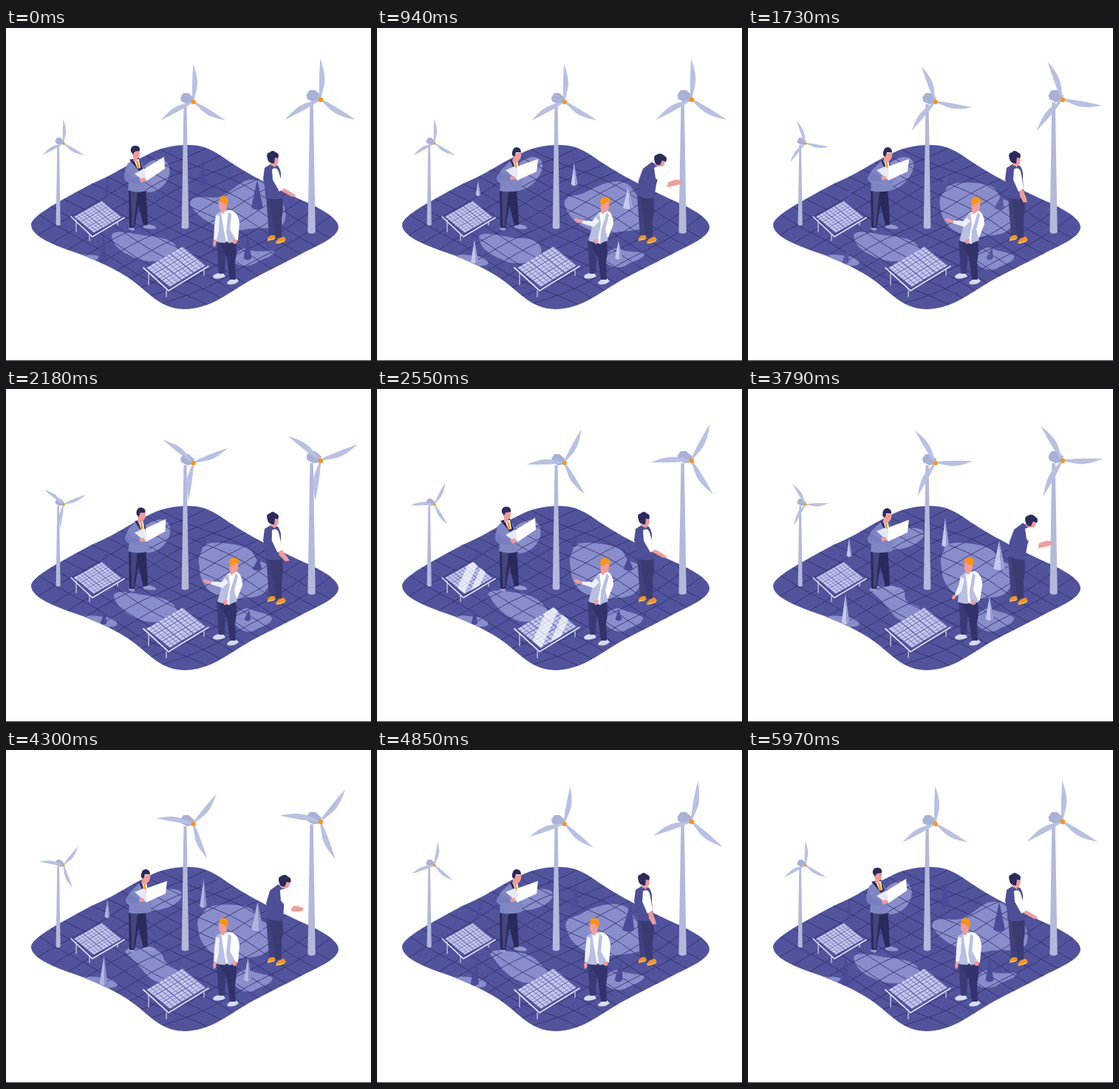
An HTML page for the animation above (6 s loop, 494 by 450 pixels).

```html
<!DOCTYPE html>
<html lang="en">
<head>
<meta charset="utf-8">
<title>Wind and solar farm</title>
<style>
html, body { margin: 0; width: 100%; height: 100%; overflow: hidden; background: #fff; }
svg { display: block; width: 494px; height: 450px; }
</style>
</head>
<body>
<svg id="stage" viewBox="0 0 494 450"></svg>
<script>
const LOOP = 6000;
const INK = '#2a2a5c', GROUND = '#51539d', PATCH = '#888dcb', STEEL = '#b2b9da',
  SKIN = '#f09c98', ORANGE = '#fa9512', COAT = '#7f86c4', VEST = '#b7bfe2', WHITE = '#fff';
const stage = document.getElementById('stage');
const updates = [];

function add(parent, tag, attrs) {
  const node = document.createElementNS('http://www.w3.org/2000/svg', tag);
  for (const name in attrs) node.setAttribute(name, attrs[name]);
  parent.appendChild(node);
  return node;
}
const group = (parent, attrs = {}) => add(parent, 'g', attrs);
const shape = (parent, fill, d) => add(parent, 'path', { d, fill });
const line = (parent, d, stroke, width) =>
  add(parent, 'path', { d, stroke, fill: 'none', 'stroke-width': width, 'stroke-linecap': 'round' });
const clip = (id, d) => add(add(defs, 'clipPath', { id }), 'path', { d });
const clamp = x => Math.max(0, Math.min(1, x));
const smooth = x => x * x * (3 - 2 * x);

// cubic-bezier(.5, 0, .5, 1), solved by bisection
function easeInOut(x) {
  let lo = 0, hi = 1;
  for (let i = 0; i < 24; i++) {
    const s = (lo + hi) / 2;
    if (1.5 * s * (1 - s) + s * s * s < x) lo = s; else hi = s;
  }
  return smooth(lo);
}

// Keys are [time, pose index]; gives the two poses in play and the blend
const track = (period, keys) => t => {
  const p = t % period;
  let i = 0;
  while (i < keys.length - 2 && p >= keys[i + 1][0]) i++;
  const [t0, from] = keys[i], [t1, to] = keys[i + 1];
  return [from, to, smooth(clamp((p - t0) / (t1 - t0)))];
};

// Each pose is the same path with other coordinates
function morph(parent, fill, timing, poses) {
  const node = shape(parent, fill, poses[0]);
  const values = poses.map(d => d.match(/-?[\d.]+/g).map(Number));
  updates.push(t => {
    const [from, to, w] = timing(t);
    let k = 0;
    node.setAttribute('d', poses[0].replace(/-?[\d.]+/g, () => {
      const a = values[from][k], b = values[to][k++];
      return (a + (b - a) * w).toFixed(2);
    }));
  });
}

// Ground
const defs = add(stage, 'defs');
add(stage, 'rect', { width: 494, height: 450, fill: WHITE });
const outline = 'M34 266C34 256 62 240 82 229C98 220 112 212 126 206C146 198 170 181 192 171' +
  'C214 158 250 155 268 161C286 167 296 177 311 186C324 194 334 200 346 206C364 216 384 225 401 233' +
  'C422 242 450 256 450 269C450 282 424 293 404 303C384 314 350 330 327 343C298 360 275 380 241 380' +
  'C208 379 193 357 172 342C152 327 126 316 104 307C76 297 34 284 34 266Z';
clip('land', outline);
shape(stage, GROUND, outline);
const land = group(stage, { 'clip-path': 'url(#land)' });

const slow = track(LOOP, [[0, 0], [2300, 1], [3700, 1], [6000, 0]]);
morph(land, PATCH, slow, [
  'M249 238C250 222 275 232 290 228C305 222 318 205 332 205C350 205 352 215 358 222C375 230 382 248 377 262C368 275 345 268 325 272C300 278 262 262 249 238Z',
  'M262 240C258 225 266 222 266 212C275 205 300 208 318 212C335 216 334 224 340 232C355 236 362 240 358 255C356 275 345 282 325 282C300 288 262 280 262 240Z'
]);
const upper = track(LOOP, [[0, 0], [1400, 1], [2550, 0], [3700, 2], [4850, 2], [5900, 0]]);
morph(land, PATCH, upper, [
  'M178 205C180 188 195 178 208 177C220 178 224 190 220 202C215 214 204 222 192 222Z',
  'M178 206C180 190 195 178 208 174C224 171 229 182 221 196C214 208 204 217 190 219Z',
  'M178 208C180 196 196 190 212 188C228 186 241 189 238 198C234 208 212 219 190 217Z'
]);
const lower = track(LOOP, [[0, 0], [940, 1], [1730, 0], [3790, 2], [5900, 0]]);
morph(land, PATCH, lower, [
  'M143 280C146 272 165 276 185 280C205 282 226 284 232 298C234 312 205 318 185 314C165 308 144 298 143 280Z',
  'M138 282C142 274 165 280 185 284C205 284 218 284 222 298C226 314 198 321 180 317C160 310 138 300 138 282Z',
  'M164 272C166 262 186 268 205 268C220 274 204 283 222 291C242 296 240 313 214 315C190 308 198 297 164 272Z'
]);
morph(land, PATCH, track(LOOP, [[0, 0], [900, 1], [4600, 1], [6000, 0]]), [
  'M88 306C98 308 112 305 125 308C126 313 118 316 108 315C100 314 94 311 88 306Z',
  'M98 309C110 304 126 307 141 309C152 313 154 320 145 321C128 323 110 317 98 309Z'
]);
morph(land, PATCH, slow, [
  'M305 313C312 306 316 296 326 298C334 304 348 301 363 301C366 308 345 312 337 318C326 324 312 322 305 313Z',
  'M305 310C312 304 320 293 330 297C338 302 353 302 360 309C360 319 343 321 335 327C322 331 310 322 305 310Z'
]);

// The lines overshoot the land on both ends and are clipped by it
function gridLine(a, b, bend, wave) {
  let d = '';
  for (let i = -2; i <= 26; i++) {
    const u = i / 24;
    const y = a[1] + (b[1] - a[1]) * u + bend * Math.sin(Math.PI * u) + wave * Math.sin(u * 9.4 + a[0] * .03);
    d += (d ? 'L' : 'M') + (a[0] + (b[0] - a[0]) * u).toFixed(1) + ' ' + y.toFixed(1);
  }
  line(land, d, '#2e2d66', .8);
}
for (let i = 1; i < 11; i++) {
  const u = i / 11;
  gridLine([35 + 200 * u, 265 - 107 * u], [240 + 210 * u, 380 - 110 * u], 8 - 18 * u, 2.4);
  gridLine([235 + 215 * u, 158 + 112 * u], [35 + 205 * u, 265 + 115 * u], 16 * u - 7, 2);
}

// Cones: they shrink and grow slowly and catch the light twice per loop
const growth = track(LOOP, [[0, 1], [2300, .42], [3700, 1], [6000, 1]]);
function cone(x, y, half, height) {
  const dark = shape(stage, '#494b98', ''), lit = group(stage);
  const left = shape(lit, '#c3c9eb', ''), right = shape(lit, '#9ba1d6', '');
  updates.push(t => {
    const [from, to, blend] = growth(t), size = from + (to - from) * blend;
    const p = t % 3000;
    const light = smooth(clamp((p - 250) / 450)) * (1 - smooth(clamp((p - 1100) / 800)));
    const lean = 4 * Math.exp(-(((p - 1850) / 400) ** 2));
    const top = `M${x + lean} ${y - height * size}`, w = half * (.65 + .35 * size);
    dark.setAttribute('d', `${top}L${x - w} ${y - 2}Q${x} ${y + 3} ${x + w} ${y - 2}Z`);
    left.setAttribute('d', `${top}L${x - w} ${y - 2}Q${x - w / 3} ${y + 1} ${x + w / 3} ${y}Z`);
    right.setAttribute('d', `${top}L${x + w / 3} ${y}L${x + w} ${y - 2}Z`);
    lit.setAttribute('opacity', light);
  });
}
cone(137, 227, 3.5, 26);
cone(267, 213, 4.8, 39);
cone(340, 245, 8, 40);
cone(132, 318, 5.5, 41);
cone(327, 313, 5.5, 33);
add(stage, 'circle', { cx: 152.5, cy: 192.5, r: .6, fill: INK });

// Solar panels, drawn on a unit square that is skewed into place
function panel(id, left, top, bottom, cols, rows, legs) {
  const right = [top[0] + bottom[0] - left[0], top[1] + bottom[1] - left[1]];
  for (const [x, y, h] of legs) line(stage, `M${x} ${y}v${h}`, '#9da2c6', 2);
  const at = ([x, y], dx, dy) => `${x + dx} ${y + dy}`;
  const quad = 'M' + [left, top, right, bottom].map(p => at(p, 0, 0)).join('L') + 'Z';
  const g = group(stage, { transform: `matrix(${top[0] - left[0]} ${top[1] - left[1]} ${bottom[0] - left[0]} ${bottom[1] - left[1]} ${left[0]} ${left[1]})` });
  add(g, 'rect', { width: 1, height: 1, fill: '#6d72b6' });
  const w = 1 / cols, h = 1 / rows;
  for (let c = 0; c < cols; c++) for (let r = 0; r < rows; r++)
    add(g, 'rect', {
      x: (c + .07) * w, y: (r + .07) * h, fill: '#c6cbee',
      width: w * (c % 3 == 2 ? .72 : .86), height: h * (r % 3 == 2 ? .72 : .86)
    });
  clip(id, quad);
  const width = right[0] - left[0], height = bottom[1] - top[1];
  const sheen = add(group(stage, { 'clip-path': `url(#${id})` }), 'path', { fill: WHITE, opacity: .68 });
  updates.push(t => {
    const x = left[0] + width * (-.5 + 2 * clamp((t - 2050) / 1000));
    const band = (x, w) => `M${x} ${bottom[1]}h${w}l${height * .45} ${-height}h${-w}Z`;
    sheen.setAttribute('d', band(x - width * .3, width * .2) + band(x, width * .14));
  });
  const rim = 'M' + at(left, -4, 0) + 'L' + at(bottom, -2, 5) + 'L' + at(right, 3, 1);
  line(stage, rim, '#e4e7f7', 1.7);
}
panel('near', [92, 255], [130, 233.5], [119, 277], 9, 9, [[95, 260, 15], [113, 279, 8], [151, 262, 4]]);
panel('far', [190, 324], [239, 295], [222, 350], 9, 9, [[193, 331, 16], [217, 355, 8], [268, 328, 6]]);

// Wind turbines
function turbine(x, y, scale, height) {
  const g = group(stage, { transform: `translate(${x} ${y}) scale(${scale})` });
  shape(g, STEEL, `M-13.5 3H-9.5L-6.7 ${height}Q-11.5 ${height + 3} -16.3 ${height}Z`);
  shape(g, '#a8b1d6', 'M-18 -6L-14 -12L-7 -12L1 -5L-2 2L-9 3L-17 -1Z');
  const rotor = group(g);
  for (let i = 0; i < 3; i++)
    add(rotor, 'path', {
      d: 'M-1 -3C-2 -18 -1 -36 0 -51C4 -39 7.5 -27 4.5 -16L1.3 -3Z', fill: '#b8c0e3', transform: `rotate(${i * 120})`
    });
  add(g, 'circle', { r: 2.9, fill: ORANGE });
  updates.push(t => {
    const turn = -360 * easeInOut(clamp((t - 850) / 4600));
    rotor.setAttribute('transform', `translate(-.6 -.6) rotate(${turn.toFixed(2)})`);
  });
}
turbine(254, 100, 1, 170);
turbine(426, 97, 1.08, 166);
turbine(78, 156, .64, 172);

// Man with laptop
const reader = track(3000, [[0, 0], [150, 0], [900, 1], [1900, 1], [2500, 0], [3000, 0]]);
const man = group(stage);
shape(man, '#9398cf', 'M186 267Q190 264 196 266Q204 268 203 271Q196 273 186 270Z');
shape(man, '#9398cf', 'M167 268H174V273Q168 275 166 271Z');
shape(man, INK, 'M177 217L189 217Q191 240 192 266L186 267L179 238Z');
shape(man, INK, 'M166 217L182 217Q183 232 178 246L174 270L167 270Z');
shape(man, '#45467c', 'M169 220L178 220L173 268L170 268Z');
morph(man, COAT, reader, [
  'M164 184L170 179L183 181Q188 190 188 205L190 220Q178 224 165 219L166 208Q160 204 160 197Z',
  'M168 192L180 180L191 181Q198 190 197 205L196 219Q180 223 166 220L167 210Q161 206 162 202Z'
]);
morph(man, INK, reader, ['M167 178L180 175L185 190L180 193Z', 'M180 179L190 177L194 191L187 194Z']);
morph(man, WHITE, reader, ['M173 178L180 177L182 189L178 190Z', 'M184 179L190 178L192 190L187 191Z']);
morph(man, ORANGE, reader, ['M176 180L179 180L181 190L178 190Z', 'M186 181L188 181L190 190L187 190Z']);
morph(man, SKIN, reader, [
  'M170 166L181 165Q182 174 178 176L177 180L172 180L172 174Z',
  'M184 170L195 168Q196 176 192 179L189 182L183 181L184 176Z'
]);
morph(man, INK, reader, [
  'M169 167Q168 159 175 159Q182 159 181 166L174 167L172 171Z',
  'M183 172Q182 162 189 161Q195 162 195 168L188 168L186 174Z'
]);
morph(man, '#e6e9f6', reader, ['M174 197L187 190L200 198L187 207Z', 'M174 192L186 187L201 198L190 206Z']);
morph(man, WHITE, reader, ['M188 190L214 174L215 190L190 207Z', 'M190 187L218 177L216 194L190 206Z']);
morph(man, '#777ebf', reader, [
  'M162 192Q157 205 165 209L182 210L184 205L170 201Z',
  'M167 195Q161 204 168 207L182 207L184 202L174 199Z'
]);
morph(man, SKIN, reader, ['M180 204L187 202L190 206L183 209Z', 'M180 201L186 200L188 204L181 206Z']);

// Man with orange hair
const talker = track(LOOP, [[0, 0], [100, 0], [800, 1], [3200, 1], [4150, 0], [6000, 0]]);
const host = group(stage);
shape(host, '#d7dbf1', 'M280 335Q286 330 294 331L297 336Q288 340 281 338Z');
shape(host, '#d7dbf1', 'M299 344Q304 338 311 338L315 342Q309 348 300 346Z');
shape(host, '#3a3b76', 'M285 286L302 286L297 310L296 332L288 332Z');
shape(host, '#32336b', 'M287 286L310 286Q314 300 310 316L311 340L303 340L299 310Z');
morph(host, WHITE, talker, [
  'M290 248L304 246Q314 248 316 264L314 287L305 290L287 286Z',
  'M299 250L311 246Q320 250 320 265L313 283L302 292L290 286Z'
]);
morph(host, VEST, talker, [
  'M284 252L291 247L293 262L298 290Q290 291 283 288Q282 268 284 252Z',
  'M294 256L301 249L303 265L298 290Q291 290 286 287Q291 272 294 256Z'
]);
morph(host, VEST, talker, [
  'M301 248L305 252L303 272L312 288L301 291L298 275Z',
  'M311 249L314 253L309 272L313 287L302 291L303 274Z'
]);
morph(host, '#eef0fa', talker, [
  'M284 253L289 254L288 274L285 287L281 286L282 268Z',
  'M296 256L301 261L293 269L278 264L278 260L291 261Z'
]);
morph(host, SKIN, talker, ['M281 286L285 287L284 294L281 296L280 291Z', 'M278 260L278 264L270 262L266 259L269 257Z']);
morph(host, SKIN, talker, [
  'M288 235L299 234Q300 243 297 247L294 251L291 249L291 246Q287 245 288 235Z',
  'M303 237L314 235Q315 244 312 247L307 250L304 252L303 246Q302 244 303 237Z'
]);
morph(host, ORANGE, talker, [
  'M288 234Q288 227 295 227Q302 228 301 236L297 240L295 235Z',
  'M302 236Q302 228 309 228Q317 229 316 236L311 235L305 240Z'
]);
morph(host, SKIN, talker, ['M306 286L313 286L312 291L308 292Z', 'M294 286L300 285L299 291L295 292Z']);

// Man by the tower
const walker = track(3000, [[0, 0], [100, 0], [680, 1], [1100, 1], [1680, 2], [1950, 2], [2500, 0], [3000, 0]]);
const guide = group(stage);
shape(guide, ORANGE, 'M354 284Q358 279 363 279L365 284Q360 288 354 287Z');
shape(guide, ORANGE, 'M365 289Q370 282 376 282L379 286Q374 292 366 291Z');
line(guide, 'M354 287L363 285M366 291L377 288', '#fff1d8', .8);
shape(guide, '#41427c', 'M352 226L367 226L364 280L356 280Z');
shape(guide, '#3a3b73', 'M356 226L374 226Q376 245 373 258L373 283L365 284Z');
const standing = 'M350 189L358 184L368 186Q373 192 372 204L374 230Q362 233 351 229Q351 215 348 204Z';
morph(guide, '#d9dcee', walker, [
  'M351 190L354 188L355 204L351 210Z',
  'M360 190L365 190L358 211L351 209Z',
  'M351 190L354 188L355 204L351 210Z'
]);
morph(guide, '#4d5096', walker, [
  standing,
  'M360 190L372 181L380 186Q383 198 378 211L375 230Q363 232 354 226Q353 214 354 207Z',
  standing
]);
const face = 'M359 174L368 173Q370 180 367 184L364 188L358 185Z';
morph(guide, SKIN, walker, [face, 'M378 178L389 177Q391 184 387 187L380 187L376 185Z', face]);
const hair = 'M354 177Q351 169 357 168Q361 164 365 168Q371 170 368 176L364 175L363 183Q355 183 354 177Z';
morph(guide, INK, walker, [
  hair, 'M376 181Q373 172 379 171Q384 168 388 172Q394 175 391 181L386 179L383 185Q377 186 376 181Z', hair
]);
morph(guide, SKIN, walker, [
  'M371 215L375 216L386 222L393 227L387 228L372 220Z',
  'M391 211L395 208L404 205L413 206L411 211L394 215Z',
  'M367 219L372 218L376 228L378 235L373 236L368 227Z'
]);
morph(guide, WHITE, walker, [
  'M360 191Q366 187 369 194L372 204L376 217L370 221L361 205Z',
  'M375 189Q382 184 386 192L390 201L394 211L390 215L377 203Z',
  'M360 191Q366 187 369 194L371 204L373 217L366 221L359 205Z'
]);

add(stage, 'rect', { y: 449, width: 494, height: 1, fill: '#3a3a3a' });

const began = performance.now();
function frame() {
  const t = (performance.now() - began) % LOOP;
  for (const update of updates) update(t);
  requestAnimationFrame(frame);
}
frame();
</script>
</body>
</html>
```
